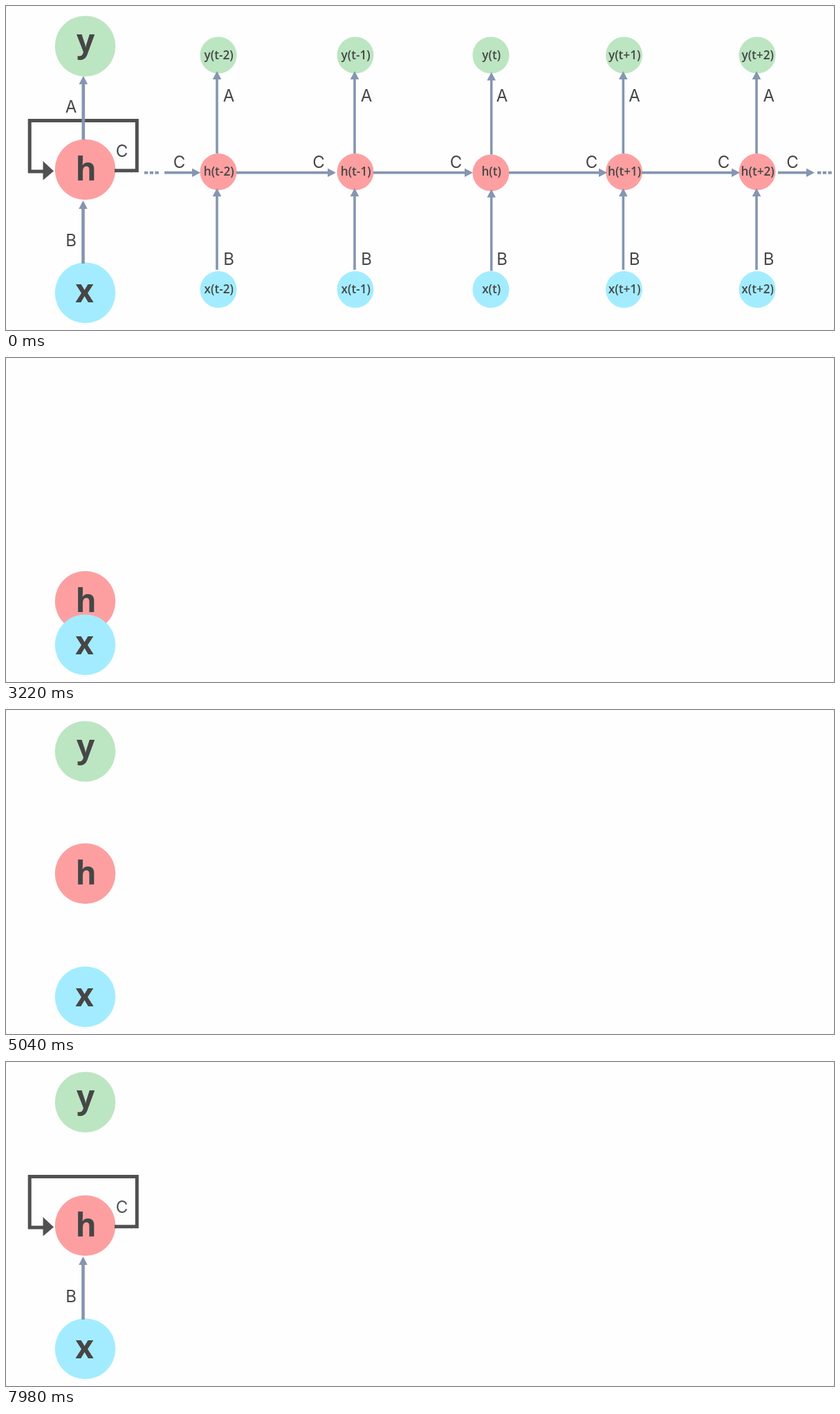
An HTML page with a canvas that plays this animation: 1197 by 468 pixels, repeating every 8 s.

```html
<!DOCTYPE html>
<html lang="en">
<head>
<meta charset="utf-8">
<title>Unrolled recurrent network</title>
<style>
html, body { margin: 0; width: 100%; height: 100%; overflow: hidden; background: #fefefe; }
canvas { display: block; }
</style>
</head>
<body>
<canvas id="stage" width="1197" height="468"></canvas>
<script>
const ctx = document.getElementById('stage').getContext('2d');
const LOOP = 8000, STEP = 140, CUT = 1260;
const BLUE = '#8496b0', DARK = '#505050', INK = '#464646';
const FILL = { x: '#a3ecff', h: '#fd9fa0', y: '#bce5c1' };

const progress = (t, start, end) => Math.min(1, Math.max(0, (t - start) / (end - start)));
const smooth = p => p * p * (3 - 2 * p);
const cubic = p => p < .5 ? 4 * p ** 3 : 1 - 4 * (1 - p) ** 3;
const mix = (a, b, p) => a + (b - a) * p;

function disc(x, y, r, color) {
  ctx.fillStyle = color;
  ctx.beginPath();
  ctx.arc(x, y, r, 0, 7);
  ctx.fill();
}

function text(str, x, y, font) {
  ctx.fillStyle = INK;
  ctx.font = font;
  ctx.textAlign = 'center';
  ctx.fillText(str, x, y);
}

const weight = (str, x, y) => text(str, x, y, '400 24px Inter, sans-serif');

function polygon(points, color) {
  ctx.fillStyle = color;
  ctx.beginPath();
  points.forEach(p => ctx.lineTo(...p));
  ctx.fill();
}

function arrowUp(x, from, tip, width = 3.6) {
  ctx.fillStyle = BLUE;
  ctx.fillRect(x - width / 2, tip + 10, width, from - tip - 10);
  polygon([[x, tip], [x + 6.3, tip + 12], [x - 6.3, tip + 12]], BLUE);
}

function arrowRight(from, tip, y = 240.7) {
  ctx.fillStyle = BLUE;
  ctx.fillRect(from, y - 1.9, tip - from - 10, 3.8);
  polygon([[tip, y], [tip - 12, y - 6.3], [tip - 12, y + 6.3]], BLUE);
}

function dots(x) {
  ctx.fillStyle = BLUE;
  for (let i = 0; i < 3; i++) ctx.fillRect(x + i * 7.7, 238.8, 5.3, 4);
}

const GLYPH = { x: [-1, 14], h: [1, 15.7], y: [.5, 9] };
function bigNode(name, y) {
  const [dx, dy] = GLYPH[name];
  disc(114.5, y, 43.8, FILL[name]);
  text(name, 114.5 + dx, y + dy, '700 46px "Open Sans", sans-serif');
}

// Grows and fades in together with its label.
function inputArrow(p) {
  if (!p) return;
  ctx.save();
  ctx.globalAlpha = p;
  weight('B', 94, 346.5);
  ctx.translate(111.5 + (1 - p) * 2, 372 + (1 - p) * 4);
  ctx.scale(p, p);
  arrowUp(0, 0, -91, 4.6);
  ctx.restore();
}

function feedback(p, labelAlpha) {
  if (!p) return;
  ctx.strokeStyle = DARK;
  ctx.lineWidth = 5;
  ctx.setLineDash([354 * p, 1000]);
  ctx.beginPath();
  [[157, 237.7], [189.3, 237.7], [189.3, 165.5], [34.2, 165.5], [34.2, 239], [55, 239]]
    .forEach(point => ctx.lineTo(...point));
  ctx.stroke();
  ctx.setLineDash([]);
  if (p === 1) polygon([[69, 238.5], [53.5, 224], [53.5, 251.5]], DARK);
  ctx.globalAlpha = labelAlpha;
  weight('C', 167.5, 218);
  ctx.globalAlpha = 1;
}

function unrolled() {
  const labelFont = '600 17.2px "Open Sans", sans-serif';
  // step name, circle centre, arrow x, label x, C label x, vertical nudge
  const columns = [
    ['t-2', 307, 305, 322, 250.5, 0],
    ['t-1', 505, 504, 521, 452, 0],
    ['t', 701, 701.7, 717, 650.5, 1.5],
    ['t+1', 893.5, 892.3, 908.5, 846.5, 0],
    ['t+2', 1086, 1085, 1102.7, 1037.5, 0]
  ];
  for (const [, cx, , , , dy] of columns) {
    disc(cx, 71, 26.5, FILL.y);
    disc(cx, 239.5 + dy, 26.5, FILL.h);
    disc(cx, 409.5, 26.5, FILL.x);
  }
  [[229, 281], [333, 477], [531, 675], [727, 869], [919, 1061], [1116, 1169]]
    .forEach(span => arrowRight(...span));
  dots(200);
  dots(1173);
  for (const [step, cx, ax, lx, bx, dy] of columns) {
    arrowUp(ax, 213 + dy, 94 + dy);
    arrowUp(ax, 381 + dy, 263 + dy);
    weight('A', lx, 138);
    weight('B', lx, 373.5);
    weight('C', bx, 234);
    text(`y(${step})`, cx + .7, 76.5, labelFont);
    text(`h(${step})`, cx + .7, 245, labelFont);
    text(`x(${step})`, cx + .7, 415, labelFont);
  }
  weight('C', 1137, 234);
}

function draw(t) {
  ctx.fillStyle = '#fefefe';
  ctx.fillRect(0, 0, 1197, 468);
  if (t < CUT) {
    bigNode('y', 58);
    bigNode('h', 236.2);
    bigNode('x', 414.2);
    feedback(1, 1);
    inputArrow(1);
    arrowUp(111.8, 193, 101, 4.6);
    weight('A', 94, 153.5);
    unrolled();
    return;
  }
  if (t >= 4030) bigNode('y', mix(236.2, 58, cubic(progress(t, 4030, 5200))));
  if (t >= 2660) bigNode('h', mix(414.2, 236.2, smooth(progress(t, 2660, 4060))));
  ctx.globalAlpha = progress(t, 1400, 2100);
  bigNode('x', 414.2);
  ctx.globalAlpha = 1;
  inputArrow(progress(t, 5600, 5820));
  feedback(progress(t, 6750, 7570), progress(t, 7700, 8000));
}

function tick() {
  const t = performance.now() % LOOP;
  draw(Math.floor(t / STEP) * STEP);
  requestAnimationFrame(tick);
}
tick();
</script>
</body>
</html>
```
